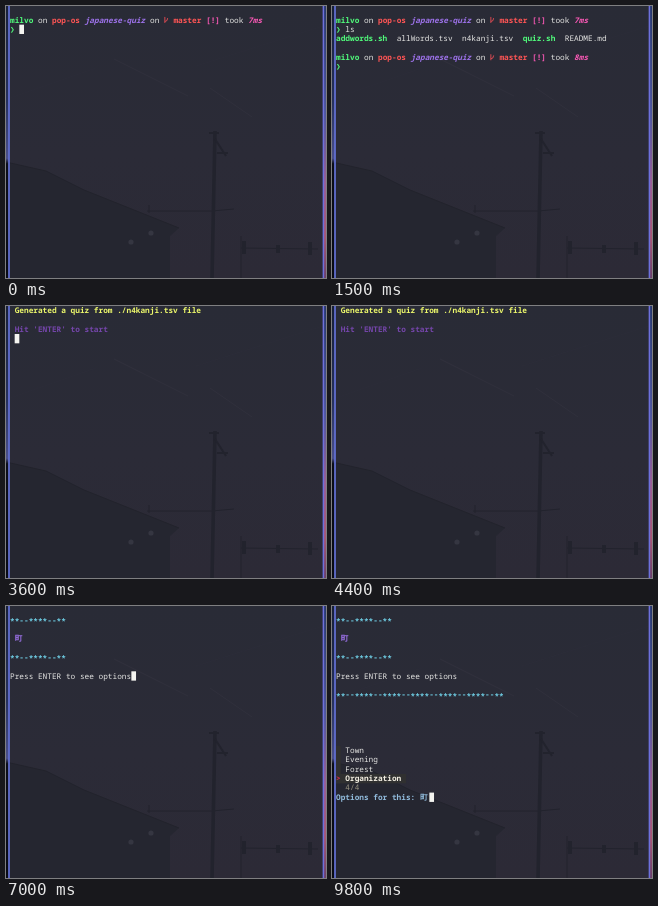
An HTML page for the animation above (10000 ms loop, 320x272 px).

```html
<!DOCTYPE html>
<html lang="en">
<head>
<meta charset="utf-8">
<title>Terminal quiz</title>
<style>
  html, body { margin: 0; width: 100%; height: 100%; overflow: hidden; background: #292a35; }
  svg { display: block; }
  text {
    font: 7.78px "Noto Sans Mono", "Noto Sans CJK JP", "DejaVu Sans Mono", monospace;
    fill: #e6e6e4; white-space: pre; text-rendering: geometricPrecision;
  }
  .b { font-weight: 700; }
  .i { font-style: italic; }
  .green { fill: #50fa7b; }
  .red { fill: #ff5555; }
  .purple { fill: #9d72ea; }
  .violet { fill: #7546ab; }
  .pink { fill: #f758b4; }
  .cyan { fill: #72d5ec; }
  .yellow { fill: #ecf76b; }
  .prompt { fill: #91bbdc; }
  .pointer { fill: #d32b4b; }
  .info { fill: #95917f; }
  .current { fill: #f4f0e4; }
</style>
</head>
<body>
<svg id="stage" width="320" height="272" viewBox="0 0 320 272">
  <defs>
    <linearGradient id="sky" x2="0" y2="1">
      <stop offset="0" stop-color="#292b36"/>
      <stop offset=".55" stop-color="#2b2b37"/>
      <stop offset="1" stop-color="#2c2a36"/>
    </linearGradient>
    <linearGradient id="leftEdge" x2="0" y2="1">
      <stop offset="0" stop-color="#182038"/>
      <stop offset=".35" stop-color="#27315c"/>
      <stop offset=".56" stop-color="#4a4f8a"/>
      <stop offset=".58" stop-color="#0c0e18"/>
      <stop offset="1" stop-color="#090b13"/>
    </linearGradient>
    <linearGradient id="rightEdge" x2="0" y2="1">
      <stop offset="0" stop-color="#27376b"/>
      <stop offset=".4" stop-color="#4f569c"/>
      <stop offset=".65" stop-color="#9a5d94"/>
      <stop offset=".85" stop-color="#a85573"/>
      <stop offset="1" stop-color="#6a3f68"/>
    </linearGradient>
  </defs>

  <rect width="320" height="272" fill="url(#sky)"/>
  <path d="M0 156 40 165 78 184 173 222 164 230V272H0Z" fill="#252630"/>
  <path d="M0 156 40 165 78 184 173 222" fill="none" stroke="#22232c"/>
  <g fill="none" stroke="#30303c">
    <path d="M108 53 182 90M204 82 246 111"/>
    <path d="M4 92 90 62M190 60 317 20" opacity=".3"/>
  </g>
  <g fill="none" stroke="#22232d">
    <path d="M209 125 206 272" stroke-width="3.5"/>
    <path d="M203 127H213M209 133 220 150M211 147H222" stroke-width="2"/>
    <path d="M141 205H206L228 203M143 199V207M235 230V272M235 242 312 243"/>
    <path d="M238 235V248M272 239V247M304 236V249" stroke-width="4"/>
  </g>
  <g fill="#353641">
    <circle cx="125" cy="236" r="2.6"/>
    <circle cx="145" cy="227" r="2.6"/>
  </g>
  <rect width="2.5" height="272" fill="url(#leftEdge)"/>
  <rect x="317" width="3" height="272" fill="url(#rightEdge)"/>
  <path d="M3 0V272" stroke="#6877e2" stroke-width="1.6"/>
  <path d="M317.4 0V272" stroke="#6d70dc" stroke-width="1.5"/>
</svg>
<script>
const NS = 'http://www.w3.org/2000/svg';
const LOOP = 10000, BLINK = 600;
const CELL_W = 4.668, CELL_H = 9.33, LEFT = 4, BASELINE = 7.2;
const stage = document.getElementById('stage');

function add(parent, tag, attrs) {
  const node = document.createElementNS(NS, tag);
  for (const key in attrs) node.setAttribute(key, attrs[key]);
  return parent.appendChild(node);
}
const group = () => add(stage, 'g', {});
const colX = col => LEFT + col * CELL_W;

function put(parent, row, col, text, cls = '', dy = 0) {
  const node = add(parent, 'text', { x: colX(col), y: row * CELL_H + BASELINE + dy, class: cls });
  node.textContent = text;
  return node;
}

function cells(parent, row, col, width, height, fill) {
  return add(parent, 'rect', {
    x: colX(col), y: row * CELL_H, width: width * CELL_W, height: height * CELL_H, fill
  });
}

function header(parent, row, duration) {
  put(parent, row, 0, 'milvo', 'b green');
  put(parent, row, 6, 'on');
  put(parent, row, 9, 'pop-os', 'b red');
  put(parent, row, 16, 'japanese-quiz', 'b i purple');
  put(parent, row, 30, 'on');
  add(parent, 'path', {
    d: 'M0 0V6M0 4.6Q2.8 4.4 2.8 1.2', fill: 'none', stroke: '#e84d55', 'stroke-width': .9,
    transform: `translate(${colX(33) + .8} ${row * CELL_H + 1.6})`
  });
  put(parent, row, 35, 'master', 'b red');
  put(parent, row, 42, '[!]', 'b pink');
  put(parent, row, 46, 'took');
  put(parent, row, 51, duration, 'b i pink');
  put(parent, row + 1, 0, '❯', 'b green');
}

// Asterisks sit on the same centre line as the hyphens.
function rule(parent, row, repeats) {
  const line = '**--' + '****--'.repeat(repeats) + '**';
  put(parent, row, 0, line.replace(/-/g, ' '), 'b cyan', 1.5);
  put(parent, row, 0, line.replace(/\*/g, ' '), 'b cyan');
}

const shell = group();
header(shell, 1, '7ms');
const firstCommand = put(shell, 2, 2, '');

const listing = group();
put(listing, 3, 0, 'addwords.sh', 'b green');
put(listing, 3, 13, 'allWords.tsv');
put(listing, 3, 27, 'n4kanji.tsv');
put(listing, 3, 40, 'quiz.sh', 'b green');
put(listing, 3, 49, 'README.md');
header(listing, 5, '8ms');
const secondCommand = put(listing, 6, 2, '');

const intro = group();
put(intro, 0, 1, 'Generated a quiz from ./n4kanji.tsv file', 'b yellow');
put(intro, 2, 1, "Hit 'ENTER' to start", 'b violet');

const question = group();
rule(question, 1, 1);
put(question, 3, 1, '町', 'b purple');
rule(question, 5, 1);
put(question, 7, 0, 'Press ENTER to see options');

const options = group();
rule(options, 9, 5);
cells(options, 15, 0, 1, 4, '#303030');
cells(options, 18, 0, 15, 1, '#303030');
['Town', 'Evening', 'Forest'].forEach((word, i) => put(options, 15 + i, 2, word));
put(options, 18, 0, '>', 'b pointer');
put(options, 18, 2, 'Organization', 'b current');
put(options, 19, 2, '4/4', 'info');
put(options, 20, 0, 'Options for this: ', 'b prompt');
put(options, 20, 18, '町', 'b prompt');

const cursor = cells(stage, 0, 0, 1, 1, '#f4f4f0');

const show = (node, on) => node.setAttribute('visibility', on ? 'visible' : 'hidden');

// Types into a node and reports the count and the time of the last key.
function type(node, text, t, start, step, idleSince) {
  const count = Math.max(0, Math.min(text.length, Math.floor((t - start) / step) + 1));
  node.textContent = text.slice(0, count);
  return { count, since: count ? start + (count - 1) * step : idleSince };
}

function placeCursor(t, row, col, since) {
  cursor.setAttribute('x', colX(col));
  cursor.setAttribute('y', row * CELL_H);
  show(cursor, Math.floor((t - since) / BLINK) % 2 === 0);
}

function draw(t) {
  const ls = type(firstCommand, 'ls', t, 300, 150, 0);
  const quiz = type(secondCommand, './quiz.sh', t, 1600, 90, 800);

  show(shell, t < 3400);
  show(listing, t >= 800 && t < 3400);
  show(intro, t >= 3400 && t < 7000);
  show(question, t >= 7000);
  show(options, t >= 8500);

  if (t < 800) placeCursor(t, 2, 2 + ls.count, ls.since);
  else if (t < 3400) placeCursor(t, 6, 2 + quiz.count, quiz.since);
  else if (t < 7000) placeCursor(t, 3, 1, 3500);
  else if (t < 8500) placeCursor(t, 7, 26, 6900);
  else placeCursor(t, 20, 20, 8500);
}

function frame() {
  draw(performance.now() % LOOP);
  requestAnimationFrame(frame);
}
frame();
</script>
</body>
</html>
```
